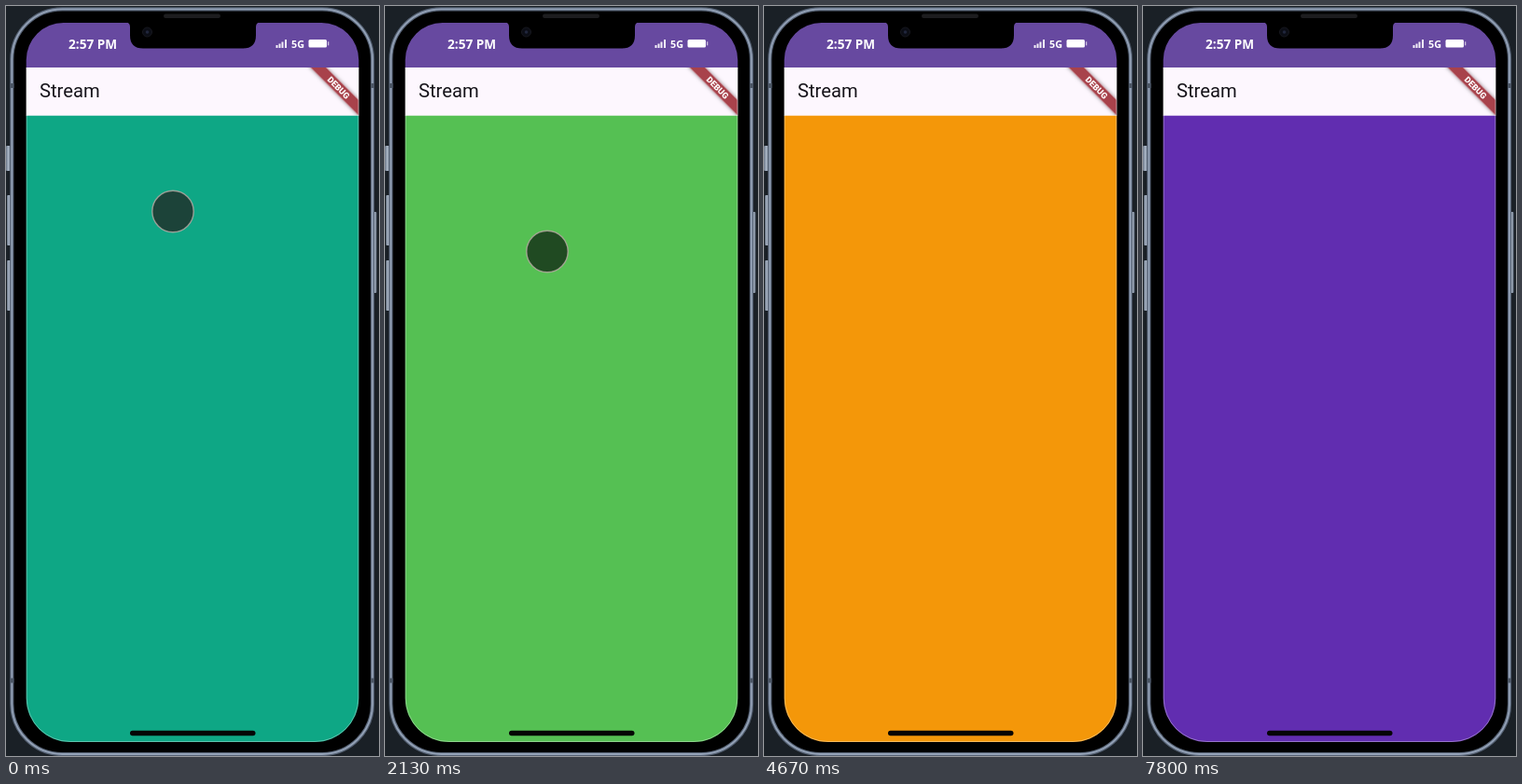
Write an HTML page that moves like this. It is 400 px wide and 805 px high and loops after 8 s.

```html
<!DOCTYPE html>
<html lang="en">
<head>
<meta charset="utf-8">
<title>Stream</title>
<style>
  html, body { margin: 0; width: 100%; height: 100%; overflow: hidden; background: #1a2026; }
  svg { display: block; width: 400px; height: 805px; }
  .status { font: 700 13.6px "Open Sans", sans-serif; fill: #fff; }
  .title { font: 400 20.2px Roboto, sans-serif; fill: #16141a; }
  .banner { font: 900 9.2px Roboto, sans-serif; fill: #fff; text-anchor: middle; }
</style>
</head>
<body>
<svg viewBox="0 0 400 805">
  <defs>
    <clipPath id="screen">
      <path d="M21.700 58a40 40 0 0 1 40-40H338.300a40 40 0 0 1 40 40V743a47 47 0 0 1-47 47H68.700a47 47 0 0 1-47-47Z"/>
    </clipPath>
    <linearGradient id="button">
      <stop stop-color="#6b7788"/><stop offset=".5" stop-color="#a9b5c5"/><stop offset="1" stop-color="#657182"/>
    </linearGradient>
    <filter id="shadow" x="-20%" y="-50%" width="140%" height="200%">
      <feDropShadow dx="0" dy="0" stdDeviation="2.2" flood-opacity=".5"/>
    </filter>
  </defs>

  <rect width="400" height="805" fill="#1a2026"/>
  <g fill="url(#button)">
    <rect x="0" y="150" width="5" height="27" rx="1"/>
    <rect x="1" y="203" width="4.500" height="54" rx="1"/>
    <rect x="1" y="273" width="4.500" height="54" rx="1"/>
    <rect x="393" y="221" width="4.500" height="87" rx="1"/>
  </g>
  <rect x="6.300" y="3.300" width="386.700" height="799.700" rx="54" fill="#000" stroke="#566274" stroke-width="4.200"/>
  <rect x="6.300" y="3.300" width="386.700" height="799.700" rx="54" fill="none" stroke="#94a2b7" stroke-width="1.800"/>
  <path d="M4 85.500H8.500M391 85.500H395M4 724H8.500M391 724H395" stroke="#4c5766" stroke-width="5"/>

  <g clip-path="url(#screen)">
    <rect x="21" y="18" width="358" height="48.500" fill="#6749a0"/>
    <rect x="21" y="66" width="358" height="52" fill="#fdf7fe"/>
    <svg x="21" y="66" width="357.300" height="51.500">
      <g transform="translate(357.300 0) rotate(45)">
        <rect x="-60" y="24.800" width="120" height="11.600" fill="#a8424b" filter="url(#shadow)"/>
        <text class="banner" x="0" y="33.900">DEBUG</text>
      </g>
    </svg>
    <text class="title" x="36" y="98">Stream</text>
    <rect id="body" x="21" y="117.700" width="358" height="673"/>
  </g>
  <path d="M22.200 66V743a46.500 46.500 0 0 0 46.500 46.500H331.300a46.500 46.500 0 0 0 46.500-46.500V66"
        fill="none" stroke="#fff" stroke-opacity=".42" stroke-width=".8"/>
  <rect x="133" y="777.800" width="134.500" height="5.400" rx="2.700" fill="#050505"/>

  <path d="M129 17.500q4 .5 4 5V31.500q0 14 14 14H254q14 0 14-14V22.500q0-4.500 4-5Z" fill="#000"/>
  <rect x="169" y="8.500" width="61" height="4.500" rx="2.200" fill="#1d1d1f"/>
  <circle cx="151.500" cy="28" r="5" fill="#0b0d15" stroke="#17181f"/>
  <circle cx="151.500" cy="28" r="1.800" fill="#20263c"/>

  <text class="status" x="67" y="46">2:57 PM</text>
  <path d="M290.500 45v-3M293.500 45v-4.500M296.500 45v-6.500M300 45v-9" stroke="#f3eff8" stroke-width="2"/>
  <text class="status" x="306" y="45" style="font-size:10.800px">5G</text>
  <rect x="324.500" y="36" width="19.500" height="8.400" rx="1.500" fill="#fff"/>
  <rect x="345" y="38.300" width="1.300" height="4" fill="#c9bcdd"/>

  <circle id="pointer" r="22.200" stroke="#b9a9a4" stroke-opacity=".8" stroke-width="1.400"/>
</svg>
<script>
  const LOOP = 8000;
  // Start time, body colour, pointer colour
  const phases = [
    [0, '#0ea785', '#1c4339'],
    [730, '#d7025e', '#560326'],
    [2000, '#55c053', '#204a22'],
    [3470, '#f49709', '#674236'],
    [4730, '#cce93e', 'none'],
    [6000, '#637f89', 'none'],
    [7470, '#612db0', 'none'],
  ];
  const moveStart = 2000, moveTime = 500, pointerEnd = 4330;
  const body = document.getElementById('body');
  const pointer = document.getElementById('pointer');
  const mix = (a, b, p) => a + (b - a) * p;

  function draw(now) {
    const t = now % LOOP;
    const [, color, dark] = phases.findLast(([start]) => t >= start);
    body.setAttribute('fill', color);

    const p = Math.min(1, Math.max(0, (t - moveStart) / moveTime));
    const eased = p * p * (3 - 2 * p);
    pointer.setAttribute('cx', mix(179, 149.5, eased));
    pointer.setAttribute('cy', mix(220.5, 473.5, eased));
    pointer.setAttribute('fill', dark);
    pointer.setAttribute('visibility', t < pointerEnd ? 'visible' : 'hidden');
  }

  const origin = performance.now();
  function tick() {
    draw(performance.now() - origin);
    requestAnimationFrame(tick);
  }
  tick();
</script>
</body>
</html>
```
